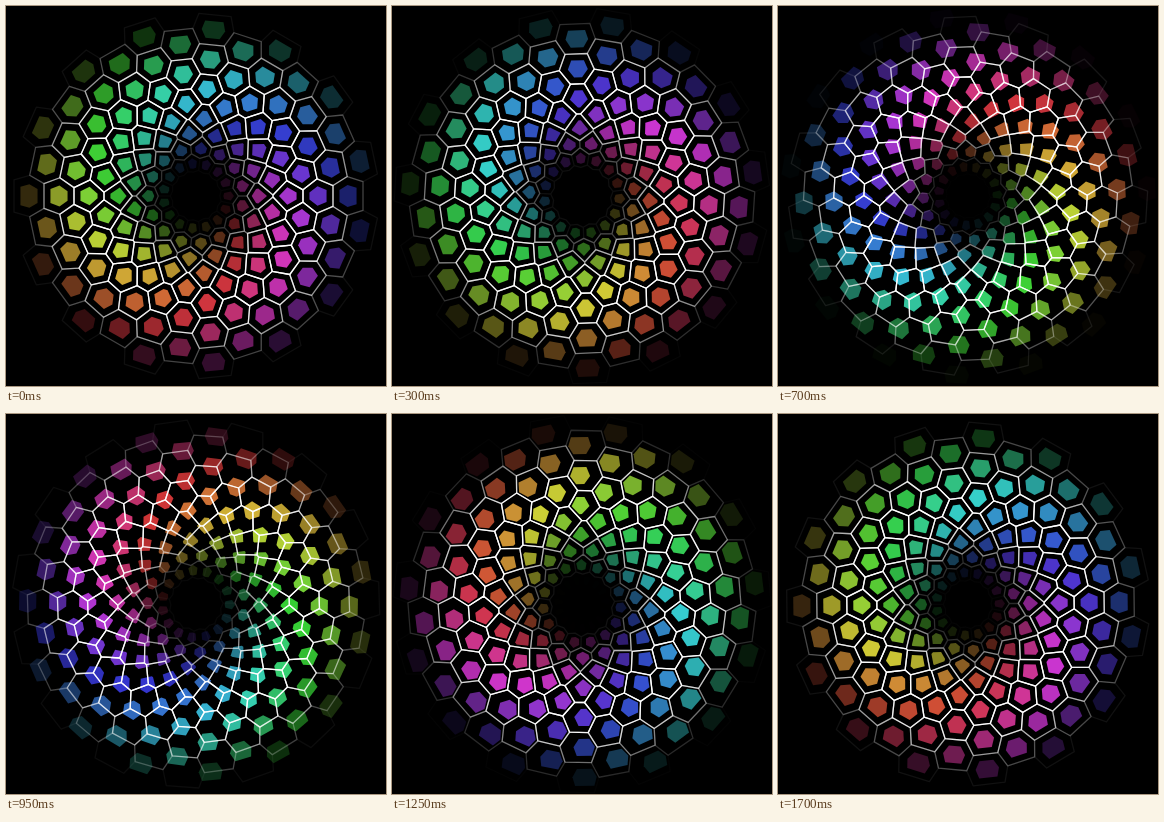
An HTML page with a canvas that plays this animation: 380x380 px, repeating every 1.75 s.

```html
<!DOCTYPE html>
<html>
<head>
<meta charset="utf-8">
<title>Honeycomb vortex</title>
<style>
html, body { margin: 0; width: 100%; height: 100%; overflow: hidden; background: #000; }
canvas { display: block; }
</style>
</head>
<body>
<canvas id="stage" width="380" height="380"></canvas>
<script>
const ctx = document.getElementById('stage').getContext('2d');
const LOOP = 1750, STEP = 50, CENTER = 190;
const PER_RING = 15, RING_GAP = 15, INNER = 23, OUTER = 181;
const SLOT = 360 / PER_RING;
const FILL_SCALE = 0.57;
const rad = deg => deg * Math.PI / 180;

const easeInOut = p => p < 0.5 ? 4 * p ** 3 : 1 - 4 * (1 - p) ** 3;
const glow = r => r <= INNER || r >= OUTER ? 0
  : Math.sin(Math.PI * (r - INNER) / (OUTER - INNER));

// Keep the part of a polygon that is nearer to the origin than to (nx, ny).
function clip(polygon, [nx, ny]) {
  const limit = (nx * nx + ny * ny) / 2;
  const side = ([x, y]) => x * nx + y * ny - limit;
  const result = [];
  polygon.forEach((a, i) => {
    const b = polygon[(i + 1) % polygon.length];
    const sa = side(a), sb = side(b);
    if (sa <= 0) result.push(a);
    if (sa * sb < 0) {
      const k = sa / (sa - sb);
      result.push([a[0] + (b[0] - a[0]) * k, a[1] + (b[1] - a[1]) * k]);
    }
  });
  return result;
}

// Voronoi cell of a site at radius r, angle 0, relative to that site.
function ringCell(r) {
  let cell = [[-60, -60], [60, -60], [60, 60], [-60, 60]];
  const neighbours = [[0, 1], [1, 0.5], [-1, 0.5], [2, 0], [-2, 0]];
  for (const [ring, slot] of neighbours) {
    const distance = r + ring * RING_GAP;
    if (distance <= 0) continue;
    for (const sign of slot ? [-1, 1] : [1]) {
      const angle = rad(sign * slot * SLOT);
      cell = clip(cell, [distance * Math.cos(angle) - r, distance * Math.sin(angle)]);
    }
  }
  return cell;
}

function addCell(cell, r, angle, scale) {
  const c = Math.cos(rad(angle)), s = Math.sin(rad(angle));
  cell.forEach(([px, py], i) => {
    const x = r + px * scale, y = py * scale;
    ctx[i ? 'lineTo' : 'moveTo'](x * c - y * s, x * s + y * c);
  });
  ctx.closePath();
}

function draw(p) {
  ctx.setTransform(1, 0, 0, 1, 0, 0);
  ctx.fillStyle = '#000';
  ctx.fillRect(0, 0, 380, 380);
  ctx.translate(CENTER, CENTER);
  ctx.lineWidth = 1.3;
  ctx.lineJoin = 'round';

  const rings = [];
  for (let k = -2; k <= 11; k++) {
    const r = 17 + RING_GAP * (k + 2 * p);
    if (glow(r)) rings.push({ r, start: k % 2 ? 0 : SLOT / 2, cell: ringCell(r) });
  }
  const angles = first => Array.from({ length: PER_RING }, (_, i) => first + i * SLOT);
  const turn = SLOT * p;

  // Hue runs around the circle and falls by half a slot per ring.
  for (const { r, start, cell } of rings) {
    for (const angle of angles(start + turn)) {
      const hue = 285 + angle + 360 * p - (r - 91) / RING_GAP * SLOT / 2;
      ctx.fillStyle = `hsla(${hue % 360}, 62%, 51%, ${glow(r) ** 1.1})`;
      ctx.beginPath();
      addCell(cell, r, angle, FILL_SCALE);
      ctx.fill();
    }
  }

  // The mesh slips behind the tiles by one slot per loop.
  const meshTurn = turn - SLOT * easeInOut(p);
  for (const { r, start, cell } of rings) {
    ctx.strokeStyle = `rgba(255, 255, 255, ${glow(r) ** 2.2})`;
    ctx.beginPath();
    for (const angle of angles(start + meshTurn)) addCell(cell, r, angle, 1);
    ctx.stroke();
  }
}

function tick() {
  const time = performance.now() % LOOP;
  draw(Math.floor(time / STEP) * STEP / LOOP);
  requestAnimationFrame(tick);
}
tick();
</script>
</body>
</html>
```
